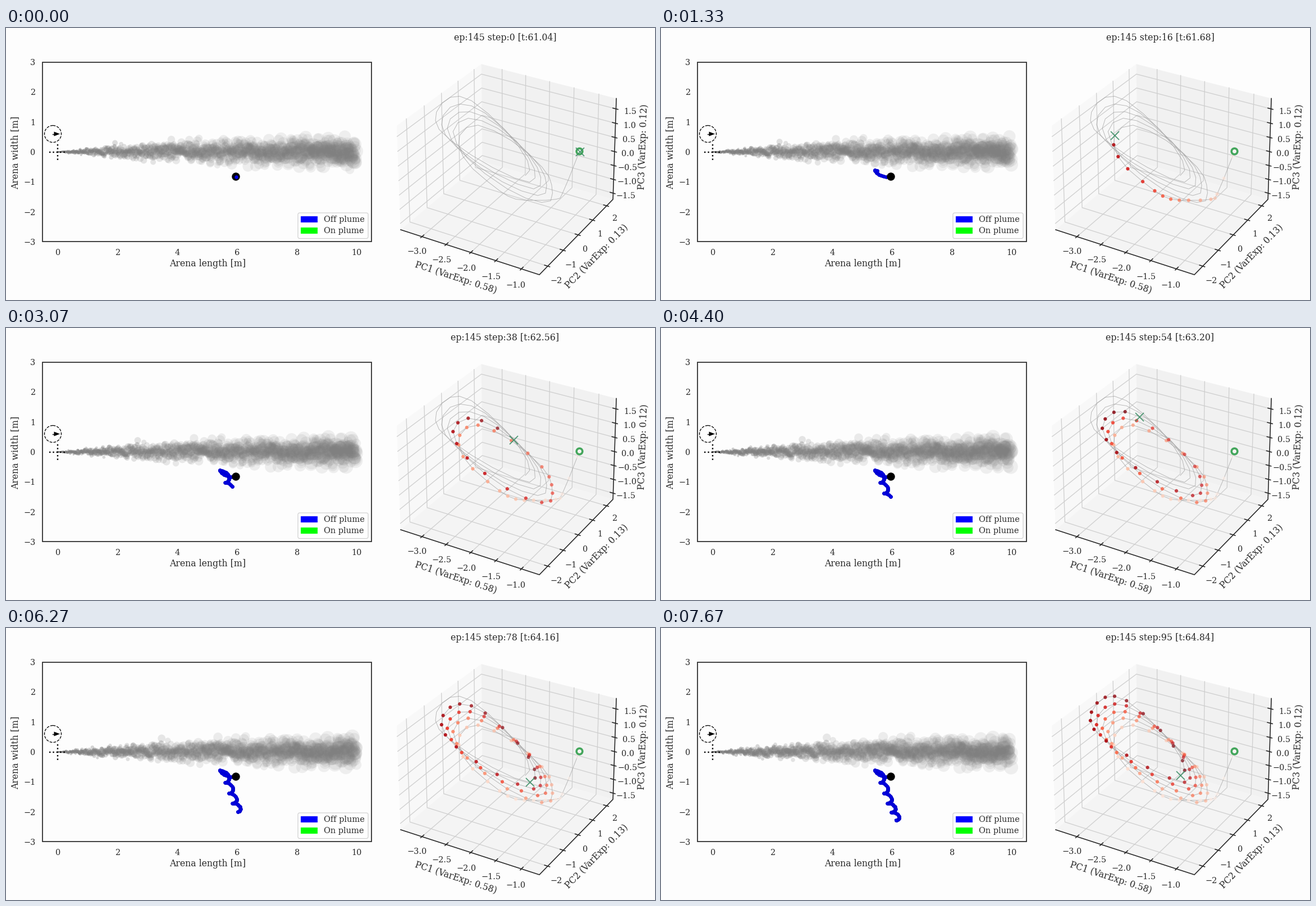
Write a matplotlib script that moves like this. It is 1156 px wide and 484 px high and loops after 7.74 s.

```python
import numpy as np
import matplotlib.pyplot as plt
from matplotlib.animation import FuncAnimation
from matplotlib.patches import Circle, FancyBboxPatch, Polygon, Rectangle

WIDTH, HEIGHT, DPI = 1156, 484, 64
PT = 72 / DPI                      # points per pixel
FRAMES, INTERVAL = 129, 60
STEPS, EPISODE = 96, 145
INK = "0.15"
TICK_SIZE, LABEL_SIZE = 14.5, 15.8

plt.rcParams["font.family"] = "DejaVu Serif"
fig = plt.figure(figsize=(WIDTH / DPI, HEIGHT / DPI), dpi=DPI, facecolor="#fdfdfd")
ax = fig.add_axes([0, 0, 1, 1])
ax.set(xlim=(-0.5, WIDTH - 0.5), ylim=(HEIGHT - 0.5, -0.5))   # pixel centres
ax.axis("off")


def text(x, y, label, size=TICK_SIZE, ha="center", va="baseline", **kw):
    return ax.text(x, y, label.replace("-", "\u2212"), fontsize=size * PT,
                   color=INK, ha=ha, va=va, **kw)


def line(points, color=INK, width=1.6, **kw):
    x, y = np.transpose(points)
    return ax.plot(x, y, color=color, lw=width * PT, **kw)[0]


def dot_area(diameter):
    return (diameter * PT) ** 2


# ---- Arena ---------------------------------------------------------------
LEFT, RIGHT, TOP, BOTTOM = 64.5, 650.5, 60.5, 379.5
UNIT = (RIGHT - LEFT) / 11
ORIGIN_X, ORIGIN_Y = LEFT + UNIT / 2, (TOP + BOTTOM) / 2


def draw_arena():
    ax.add_patch(Rectangle((LEFT, TOP), RIGHT - LEFT, BOTTOM - TOP, fill=False,
                           ec=INK, lw=1.7 * PT, zorder=6))
    for v in range(0, 11, 2):
        text(ORIGIN_X + v * UNIT + 0.5, 404, str(v))
    for v in range(-3, 4):
        text(52, ORIGIN_Y - v * UNIT + 5.5, str(v), ha="right")
    text(358.5, 423.5, "Arena length [m]", LABEL_SIZE)
    text(16.5, 221, "Arena width [m]", LABEL_SIZE, va="center", rotation=90)

    # wind direction and source marker
    ax.add_patch(Circle((83, 188), 15, fill=False, ec="k", ls="--",
                        lw=1.3 * PT, zorder=5))
    ax.add_patch(Polygon([(85, 184), (95.5, 188), (85, 192)], color="k", lw=0, zorder=5))
    line([(82.5, 188), (87, 188)], "k", 1.4, zorder=5)
    line([(76.5, 220.5), (107, 220.5)], "k", 2.4, ls=":", zorder=5)
    line([(91.3, 206.5), (91.3, 237)], "k", 2.4, ls=":", zorder=5)

    ax.add_patch(FancyBboxPatch((519.5, 328.5), 125, 45.5, fc="white", ec="0.8",
                                boxstyle="round,pad=0,rounding_size=3",
                                lw=1.1 * PT, zorder=7))
    for y, color, label in ((334, "#0000ff", "Off plume"), (354.5, "#00ff00", "On plume")):
        ax.add_patch(Rectangle((524.5, y), 30, 11, color=color, lw=0, zorder=8))
        text(566, y + 10.3, label, ha="left", zorder=8)


# ---- Smoke puffs ---------------------------------------------------------
rng = np.random.default_rng(7)
PUFFS = 1300
puff_start = np.linspace(0, 10, PUFFS, endpoint=False)
puff_side = rng.normal(0, 1, PUFFS)
puff_scale = rng.uniform(0.7, 1.2, PUFFS)
puffs = ax.scatter(puff_start, puff_start, s=1, lw=0, zorder=2)


def update_plume(step):
    x = (puff_start + 0.02 * step) % 10
    spread = 12 * (1 - np.exp(-x / 3.6))
    radius = (1 + 2 * x ** 0.7) * puff_scale
    rgba = np.full((PUFFS, 4), 0.5)
    rgba[:, 3] = 0.11 + 0.4 * np.exp(-x / 2)
    puffs.set_offsets(np.column_stack([ORIGIN_X + x * UNIT,
                                       ORIGIN_Y + spread * puff_side]))
    puffs.set_sizes(dot_area(2 * radius))
    puffs.set_facecolors(rgba)


# ---- Box of principal components -----------------------------------------
# Perspective from the near-left corner and three vanishing points.
CORNER = np.array([702.5, 358.5])
VANISH = np.array([(-4056, -1183), (2478, -1125), (902, 5650)])
PULL = np.array([-0.04935, 0.0892, -0.03378])


def project(*abc):
    w = PULL * abc
    return (CORNER + w @ VANISH) / (1 + w.sum())


def poly(*corners):
    return [project(*c) for c in corners]


def draw_box():
    for shade, corners in (
            ("#f8f8f8", [(0, 0, 0), (0, 1, 0), (0, 1, 1), (0, 0, 1)]),
            ("#f1f1f1", [(0, 1, 0), (1, 1, 0), (1, 1, 1), (0, 1, 1)]),
            ("#f4f4f4", [(0, 0, 0), (1, 0, 0), (1, 1, 0), (0, 1, 0)])):
        ax.add_patch(Polygon(poly(*corners), fc=shade, ec="none", zorder=1))

    x_ticks = np.linspace(0.16, 0.876, 5)
    y_ticks = np.linspace(0.105, 0.907, 5)
    z_ticks = np.linspace(0.063, 0.9, 7)
    grid = ([poly((a, 0, 0), (a, 1, 0), (a, 1, 1)) for a in x_ticks]
            + [poly((1, b, 0), (0, b, 0), (0, b, 1)) for b in y_ticks]
            + [poly((0, 0, c), (0, 1, c), (1, 1, c)) for c in z_ticks])
    for points in grid:
        line(points, "0.81", 1.3, zorder=2)

    line(poly((0, 0, 0), (1, 0, 0), (1, 1, 0), (1, 1, 1)), zorder=3)
    near, far = -0.014, 0.022
    ticks = ([poly((a, near, 0), (a, far, 0)) for a in x_ticks]
             + [poly((1 - near, b, 0), (1 - far, b, 0)) for b in y_ticks]
             + [poly((1 - near, 1, c), (1 - far, 1, c)) for c in z_ticks])
    for points in ticks:
        line(points, zorder=3)

    for start, end, values, form in (
            ((732, 396), (908, 456), np.arange(-3, -0.9, 0.5), ".1f"),
            ((980, 448), (1083, 337), range(-2, 3), "d"),
            ((1104, 297.5), (1111, 147.5), np.arange(-1.5, 1.6, 0.5), ".1f")):
        for (x, y), v in zip(np.linspace(start, end, len(values)), values):
            text(x, y + 5.3, format(v, form))

    for x, y, angle, label in ((800.5, 444, -18, "PC1 (VarExp: 0.58)"),
                               (1051.5, 406, 45.6, "PC2 (VarExp: 0.13)"),
                               (1134.5, 211, 88, "PC3 (VarExp: 0.12)")):
        text(x, y, label, LABEL_SIZE, va="center", rotation=angle)


# ---- Trajectories --------------------------------------------------------
def spline(keys, s):
    """Catmull-Rom curve through evenly spaced keys."""
    p = np.vstack([keys[:1], keys, keys[-1:]])
    k = s.astype(int)
    u = (s - k)[:, None]
    a, b, c, d = (p[k + j] for j in range(4))
    return b + 0.5 * u * (c - a + u * (2 * a - 5 * b + 4 * c - d
                                       + u * (3 * (b - c) + d - a)))


def agent_path(step):
    """A curved entry, then half loops that drift down and to the right."""
    first, period = 15.3, 16.2
    if step < first:
        t = step / first
        weights = [(1 - t) ** 3, 3 * t * (1 - t) ** 2, 3 * t * t * (1 - t), t ** 3]
        return weights @ np.array([(409, 264), (385, 268), (376, 247), (382, 253.7)])
    loop, u = divmod((step - first) / period - 1, 1)
    fall = loop + (1 - np.cos(np.pi * u)) / 2
    return np.array([389 + 6.75 * (loop + u) + 11 * np.sin(np.pi * u),
                     274.5 + 20 * fall - 0.8 * fall ** 2])


def state_path(steps):
    """A run-in to a tilted loop that shifts up and left on every turn."""
    run_in = np.array([(1021, 219), (992, 291), (980, 304), (938, 306),
                       (904, 303), (872, 284), (820, 238)])
    loop = np.array([(806, 195), (837, 172), (900, 200), (957, 250),
                     (972, 283), (964, 310), (905, 293), (826, 236)])
    first, period, turns = 15.7, 17.25, 5
    phase = np.arange(len(loop))[:, None]
    shift = 14 * (1 + 0.3 * np.cos(np.pi * (phase - 2.3) / 2))
    keys = np.vstack([run_in] + [loop - n * shift for n in range(turns)])
    s = (steps - first) * len(loop) / period + len(run_in)
    return spline(keys, np.maximum(s, 0))


agent = np.array([agent_path(s) for s in range(STEPS)])
state = state_path(np.arange(STEPS))
# nearer states are more opaque
opacity = np.interp(state[:, 0] - 0.6 * state[:, 1], [650, 850], [1, 0.55])

draw_arena()
draw_box()
line(state, "0.6", 0.9, alpha=0.7, zorder=4)
ax.add_patch(Circle(state[0], 5.3, fc="#f4f4f4", ec="#44a65c", lw=3.6 * PT, zorder=4))
ax.add_patch(Circle(agent[0], 7.2, color="k", lw=0, zorder=4))
blue = dict(marker="o", color="#0000e6", mec="#0000c8", mew=0.8 * PT)
trail = line(agent[:1], width=5, ms=5.8 * PT, zorder=3, **blue)
head = line(agent[:1], width=0, ms=5.8 * PT, zorder=5, **blue)
visited = ax.scatter([], [], s=dot_area(6.2), lw=0, zorder=5)
cross = line(state[:1], marker="x", ms=15 * PT, mew=1.8 * PT, mec="#3f9068",
             alpha=0.9, zorder=6)
title = text(888.5, 22, "", LABEL_SIZE)


def update(frame):
    # the picture is refreshed 15 times a second, the agent moves 12.5 times
    refresh = (frame * INTERVAL + 55) * 3 // 200
    step = min(max(-(-refresh * 5 // 6) - 1, 0), STEPS - 1)

    update_plume(step)
    trail.set_data(*agent[:step + 1].T)
    head.set_data(*agent[step:step + 1].T)
    cross.set_data(*state[step:step + 1].T)

    colors = plt.cm.Reds(np.arange(step) / (step + 2))
    colors[:, 3] = opacity[:step]
    visited.set_offsets(state[:step])
    visited.set_facecolors(colors)

    title.set_text(f"ep:{EPISODE} step:{step} [t:{61.04 + 0.04 * step:.2f}]")
    return puffs, trail, head, cross, visited, title


anim = FuncAnimation(fig, update, frames=FRAMES, interval=INTERVAL,
                     repeat=True, repeat_delay=0, blit=False)
plt.show()
```
